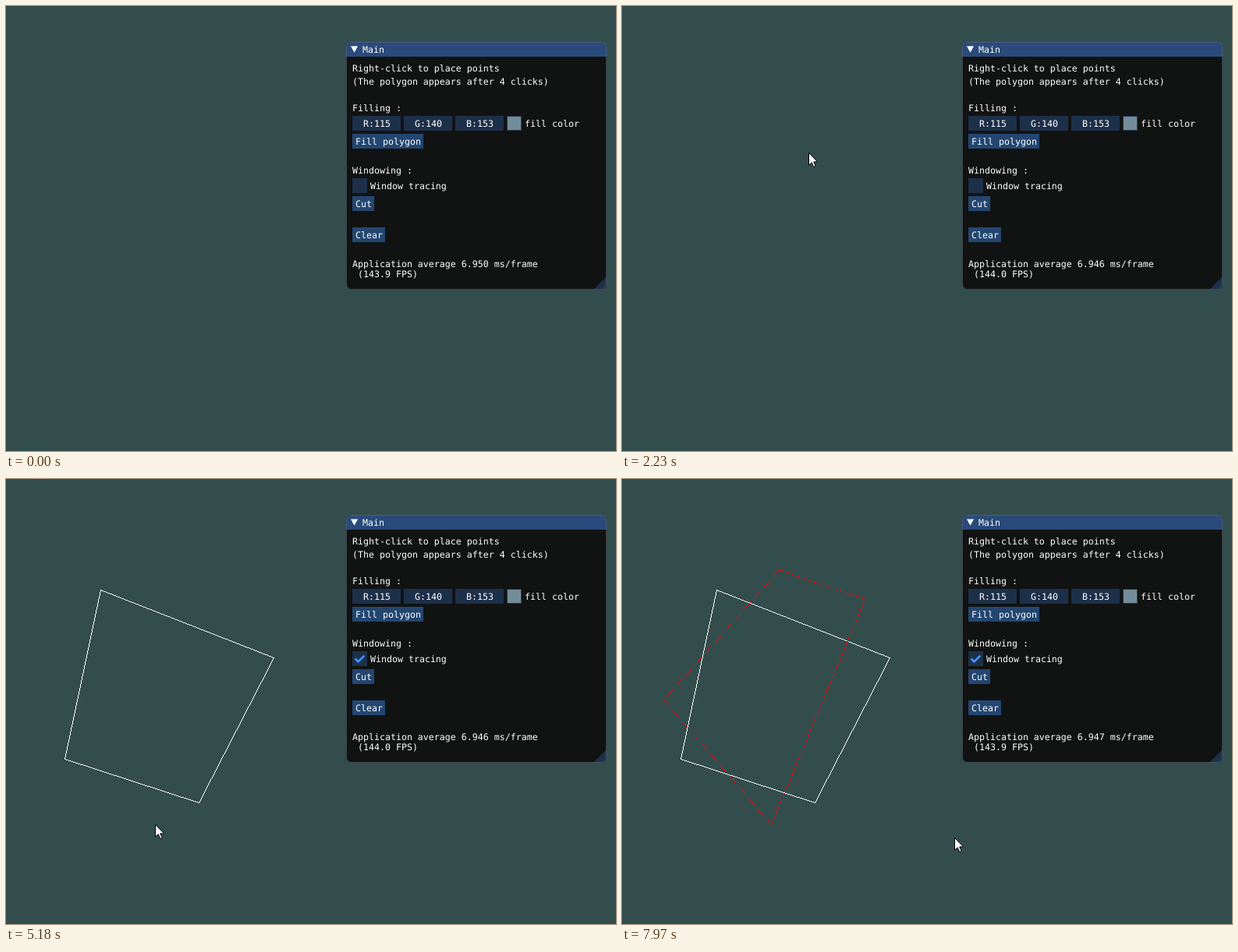
An HTML page that plays this animation: 782 px wide and 571 px high, repeating every 8000 ms.

```html
<!DOCTYPE html>
<html lang="en">
<head>
<meta charset="utf-8">
<title>Polygon tool</title>
<style>
html, body { margin: 0; width: 100%; height: 100%; overflow: hidden; background: #334d4d; }
svg { display: block; }
text {
  font: 11.627px "DejaVu Sans Mono", monospace;
  fill: #fff;
  text-rendering: geometricPrecision;
}
</style>
</head>
<body>
<svg width="782" height="571" viewBox="0 0 782 571">
  <defs><clipPath id="round"><rect x="436" y="46" width="334" height="318" rx="7"/></clipPath></defs>
  <path id="poly" fill="#fff" shape-rendering="crispEdges"/>
  <path id="cut" fill="#f00" shape-rendering="crispEdges"/>
  <g clip-path="url(#round)">
    <rect x="436" y="46" width="334" height="318" fill="#111313"/>
    <rect x="436" y="46" width="334" height="19" fill="#294a7a"/>
    <path d="M753 364L770 347V364Z" fill="#1c304a"/>
  </g>
  <rect x="436.5" y="46.5" width="333" height="317" rx="6.5" fill="none" stroke="#6e6e80" stroke-opacity=".5"/>
  <path d="M442 51.6H451L446.5 59.8Z" fill="#fff"/>
  <g id="panel"></g>
  <path id="tick" d="M447.6 230.5L451.5 234.4L459.3 226.6" fill="none" stroke="#4296fa" stroke-width="2.6"/>
  <path id="cursor" d="M.5 .5V16.2L4.2 12.8L6.8 18.6L9.2 17.5L6.7 11.9H11.6Z" fill="#fff" stroke="#000"/>
</svg>
<script>
const LOOP = 8000, STEP = 77.58, FIRST = 290;
const FRAME = '#1d304a', BUTTON = '#234670';
const $ = id => document.getElementById(id);

function add(tag, attrs, text = '') {
  const el = document.createElementNS('http://www.w3.org/2000/svg', tag);
  for (const k in attrs) el.setAttribute(k, attrs[k]);
  el.textContent = text;
  return $('panel').appendChild(el);
}
const label = (x, y, s) => add('text', { x, y }, s);
const box = (x, y, width, fill) => add('rect', { x, y, width, height: 19, fill });
function button(y, s) {
  box(444, y, s.length * 7 + 7, BUTTON);
  label(448, y + 14, s);
}

label(457, 60, 'Main');
label(444, 84, 'Right-click to place points');
label(444, 101, '(The polygon appears after 4 clicks)');
label(444, 135, 'Filling :');
['R:115', 'G:140', 'B:153'].forEach((s, i) => {
  box(444 + i * 66, 141, 62, FRAME);
  label(458 + i * 66, 155, s);
});
add('rect', { x: 642.5, y: 141.5, width: 18, height: 18, fill: '#738c99', stroke: '#22384f' });
label(665, 155, 'fill color');
button(164, 'Fill polygon');
label(444, 215, 'Windowing :');
const check = box(444, 221, 19, FRAME);
label(467, 235, 'Window tracing');
button(244, 'Cut');
button(284, 'Clear');
const avg = label(444, 335);
const fps = label(451, 348);

// Closed outline of whole pixels; dashes(i) gives [on, off] for an edge
function outline(points, dashes = () => [1, 0]) {
  let d = '';
  points.forEach(([x, y], i) => {
    const [x2, y2] = points[(i + 1) % points.length];
    const [on, off] = dashes(i);
    const n = Math.max(Math.abs(x2 - x), Math.abs(y2 - y));
    for (let k = 0; k < n; k++) {
      if (k % (on + off) >= on) continue;
      const px = Math.round(x + (x2 - x) * k / n), py = Math.round(y + (y2 - y) * k / n);
      d += `M${px} ${py}h1v1h-1z`;
    }
  });
  return d;
}
const quad = [[247, 415], [343, 229], [121, 142], [75, 359]];
const cutter = [[191, 443], [311, 154], [201, 116], [53, 283]];
$('poly').setAttribute('d', outline(quad));
$('cut').setAttribute('d', outline(cutter, i => i < 2 ? [5, 2] : [9, 5]));

// Pointer stops: arrive, leave, place
const stops = [
  [FIRST, FIRST, [612, 420]],
  [680, 680, [113, 500]],
  [1000, 1160, quad[0]],
  [1697, 2000, quad[1]],
  [2480, 2630, quad[2]],
  [3009, 3390, quad[3]],
  [3860, 4200, [457, 231]],
  [4950, 5260, cutter[0]],
  [5730, 5890, cutter[1]],
  [6270, 6430, cutter[2]],
  [6890, 7120, cutter[3]],
  [7740, 7900, [401, 478]],
  [7960, LOOP, [426, 460]]
];
const ease = u => u * u * (3 - 2 * u);

function pointer(t) {
  const i = Math.max(1, stops.findIndex(([arrive]) => t < arrive));
  const j = t >= stops.at(-1)[0] ? stops.length - 1 : i;
  const [, leave, from] = stops[j - 1], [arrive, , to] = stops[j];
  const u = ease(Math.min(1, Math.max(0, (t - leave) / (arrive - leave))));
  return from.map((v, c) => Math.round(v + (to[c] - v) * u));
}

const show = (id, on) => $(id).setAttribute('visibility', on ? 'visible' : 'hidden');

function draw(t) {
  // The screen is sampled at a fixed rate
  const s = FIRST + Math.floor((t - FIRST + 6) / STEP) * STEP;
  const [x, y] = pointer(s);
  $('cursor').setAttribute('transform', `translate(${x} ${y})`);
  show('cursor', s >= FIRST);
  show('poly', t >= 3235);
  show('cut', t >= 7115);
  show('tick', t >= 4095);
  const over = x >= 444 && x < 463 && y >= 221 && y < 240;
  check.setAttribute('fill', over ? BUTTON : FRAME);
  const ms = t < 70 ? '6.950' : t < 6820 ? '6.946' : '6.947';
  avg.textContent = `Application average ${ms} ms/frame`;
  fps.textContent = `(${t < 70 || t >= 7115 ? '143.9' : '144.0'} FPS)`;
}

const start = performance.now();
function run() {
  draw((performance.now() - start) % LOOP);
  requestAnimationFrame(run);
}
run();
</script>
</body>
</html>
```
